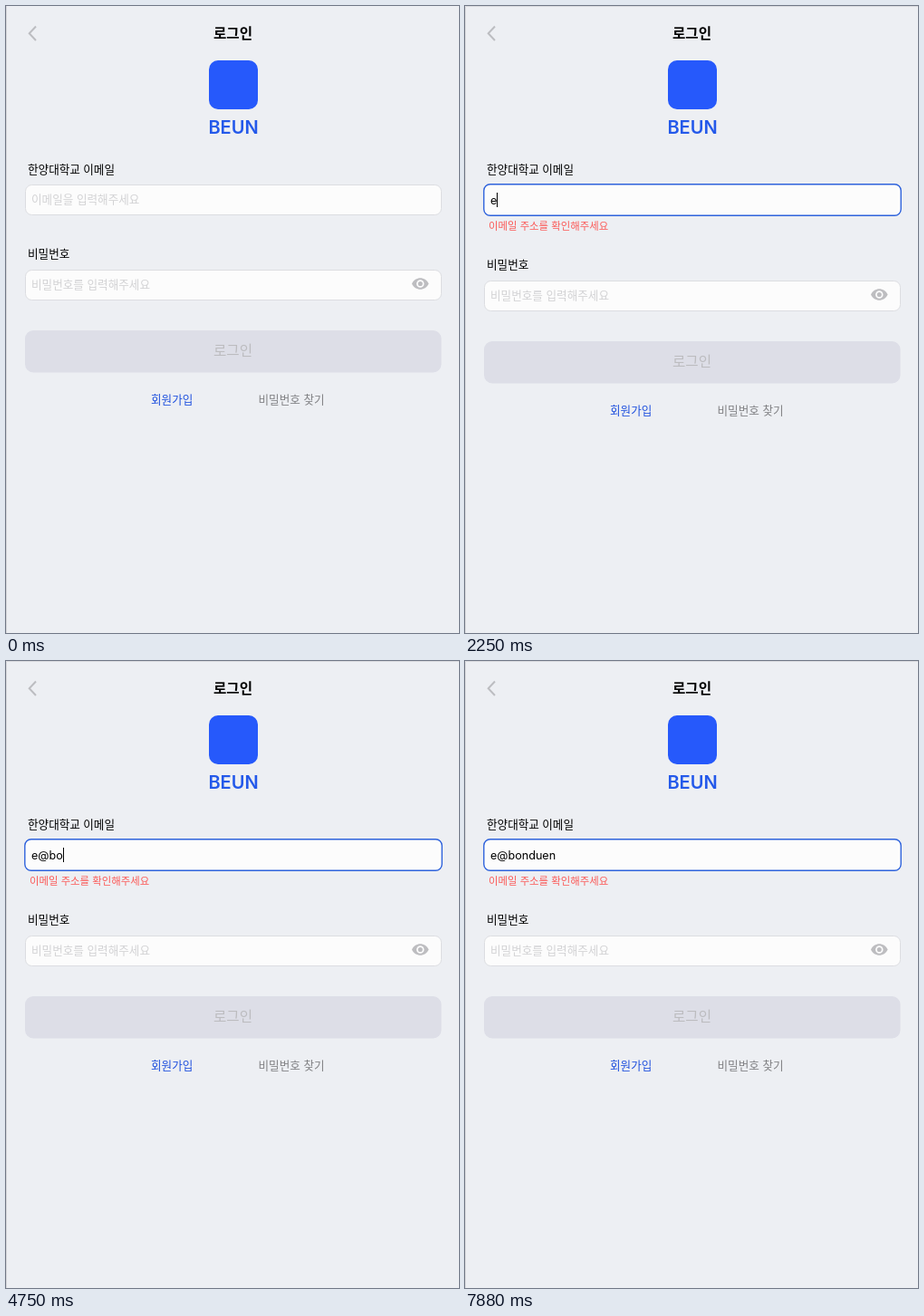
Animation of 500 by 692 pixels, one loop 8 s. Source, as an HTML page:

```html
<!DOCTYPE html>
<html lang="ko">
<head>
<meta charset="utf-8">
<style>
  html, body { margin: 0; width: 100%; height: 100%; overflow: hidden; background: #edeff3; }
  svg { display: block; width: 500px; height: 692px; }
  text { font: 500 12.6px Inter, "Noto Sans CJK KR", "Noto Sans CJK", sans-serif; white-space: pre; }
  .title { font-size: 15.6px; font-weight: 600; text-anchor: middle; }
  .hint { fill: #d2d2d4; font-weight: 400; }
  .field { fill: #fcfcfc; stroke: #dcdde1; }
  .focused { stroke: #2f63dc; stroke-width: 1.4; }
</style>
</head>
<body>
<svg viewBox="0 0 500 692">
  <path d="M.5 0V692" stroke="#d3d4d8"/>
  <path id="topEdge" d="M0 .5H500" stroke="#d9dade"/>
  <path d="M33 22.5 25.7 30.2 33 38" fill="none" stroke="#bcbdc1" stroke-width="2"/>
  <text class="title" x="250.5" y="35.7">로그인</text>
  <rect x="224" y="60" width="54" height="54" rx="10" fill="#2659fb"/>
  <text x="251" y="141" style="font-size:20px;font-weight:600" text-anchor="middle" fill="#2459ea">BEUN</text>

  <text x="24" y="185">한양대학교 이메일</text>
  <rect id="emailBox" class="field" x="21.5" y="197.5" width="459" height="33" rx="7"/>
  <text id="emailHint" class="hint" x="28" y="218">이메일을 입력해주세요</text>
  <text id="email" x="28" y="218.7" style="font-weight:400"></text>
  <path id="caret" d="M.5 206V222" stroke="#000"/>
  <text id="error" x="26" y="247.3" style="font-size:11.4px;font-weight:400" fill="#fb5a58">이메일 주소를 확인해주세요</text>

  <g id="lower">
    <text x="24" y="278.3">비밀번호</text>
    <rect class="field" x="21.5" y="291.5" width="459" height="33" rx="7"/>
    <text class="hint" x="28" y="311.7">비밀번호를 입력해주세요</text>
    <path d="M448 306.5C451.5 298.2 463 298.2 466.5 306.5C463 314.8 451.5 314.8 448 306.5Z" fill="#bdbdc0"/>
    <circle cx="457.3" cy="306.5" r="3.4" fill="#bdbdc0" stroke="#fcfcfc" stroke-width="1.7"/>
    <rect x="21" y="358" width="459.5" height="46.5" rx="9" fill="#dddee7"/>
    <text class="title" x="250.5" y="386" fill="#bcbcbf" style="font-weight:500">로그인</text>
    <text x="160" y="439" fill="#2152de">회원가입</text>
    <text x="278.5" y="439" fill="#808184" style="font-weight:400">비밀번호 찾기</text>
  </g>
  <path id="pointer" d="M0 0V12.6L2.9 9.9 5 14.6 7.1 13.7 5.1 9.1H9Z" fill="#000" stroke="#fff" stroke-width=".9"/>
</svg>
<script>
  const $ = id => document.getElementById(id);
  const show = (id, on) => $(id).style.display = on ? '' : 'none';

  const LOOP = 8000, TICK = 125, BLINK = 4;
  const FOCUS = 7, POINTER_IN = 1, POINTER_REST = 5, POINTER_OUT = 12;
  const ADDRESS = 'e@bonduen';
  const keyTicks = [16, 29, 33, 36, 42, 46, 49, 52, 58];

  function draw(now) {
    const tick = Math.floor(now % LOOP / TICK);
    const count = keyTicks.filter(k => k <= tick).length;
    const focused = tick >= FOCUS;
    const lastInput = count ? keyTicks[count - 1] : FOCUS;

    $('email').textContent = ADDRESS.slice(0, count);
    const caretX = 28 + Math.round(count ? $('email').getComputedTextLength() : 0);
    $('caret').setAttribute('transform', `translate(${caretX})`);
    show('caret', focused && (tick - lastInput) % (2 * BLINK) < BLINK);
    show('emailHint', !count);
    show('error', count);
    show('topEdge', focused);
    $('emailBox').classList.toggle('focused', focused);
    const grow = focused ? 0.7 : 0;
    for (const [name, value, sign] of [['x', 21.5, -1], ['y', 197.5, -1], ['width', 459, 2], ['height', 33, 2]])
      $('emailBox').setAttribute(name, value + sign * grow);
    $('lower').setAttribute('transform', `translate(0 ${count ? 12 : 0})`);

    const p = Math.min(1, Math.max(0, (tick - POINTER_IN) / (POINTER_REST - POINTER_IN)));
    const away = (1 - p) ** 2;
    $('pointer').setAttribute('transform', `translate(${152.3 + 180 * away} ${219 + 207 * away})`);
    show('pointer', tick >= POINTER_IN && tick < POINTER_OUT);
  }

  const start = performance.now();
  (function frame() {
    draw(performance.now() - start);
    requestAnimationFrame(frame);
  })();
</script>
</body>
</html>
```
